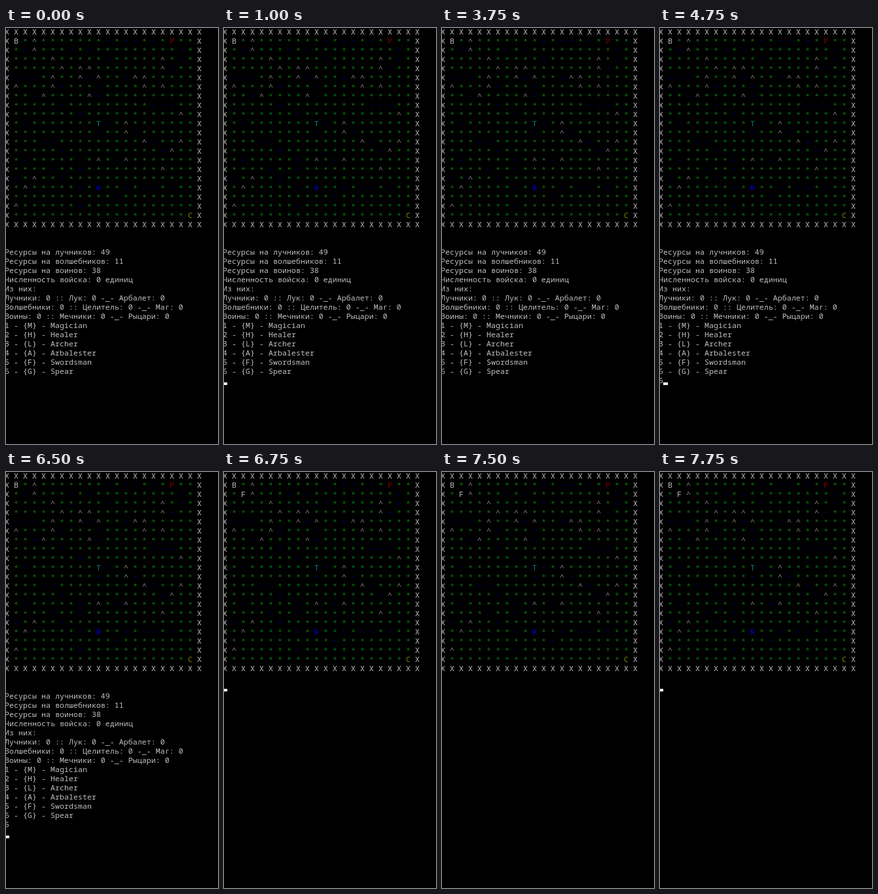
Recreate the animation shown at these times as an HTML page with a canvas. Size 324 by 635 pixels, loop 8000 ms.

```html
<!DOCTYPE html>
<html lang="ru">
<head>
<meta charset="utf-8">
<title>Console strategy</title>
<style>
html, body { margin: 0; width: 100%; height: 100%; overflow: hidden; background: #000; }
canvas { display: block; }
</style>
</head>
<body>
<canvas id="screen" width="324" height="635"></canvas>
<script>
const ctx = document.getElementById('screen').getContext('2d');
const LOOP = 8000, CHAR = 7, LINE = 14, LEFT = -2, BASE = 10;
const GRAY = '#c0c0c0';
const COLORS = {
  '*': '#0b7a0b', '~': '#000080', '^': '#8c8c8c',
  T: '#008080', R: '#0000e0', P: '#800000', C: '#808000'
};

const field = [
  'B*^*******~*~~*~*P**',
  '*~^***~*~*********~*',
  '****^*****~*****^*~*',
  '*****^*^^*******^~**',
  '~~~*^**^~^**~^^*****',
  '^***^~***~****^*^***',
  '**~^****^~**********',
  '*****~*********~~~**',
  '*******~**********^*',
  '*~*******T~*^*******',
  '*********~**^~******',
  '***~~*********^~**^*',
  '*****~**********~^**',
  '*~*****~*^*~^*******',
  '****~**~********^***',
  '~*^**~**************',
  '*^*****~*R**~*~~*~**',
  '***********~********',
  '^******~************',
  '*******************C'
];
const wall = 'X'.repeat(22);
const map = [wall, ...field.map(row => 'X' + row + 'X'), wall];

const info = [
  'Ресурсы на лучников: 49',
  'Ресурсы на волшебников: 11',
  'Ресурсы на воинов: 38',
  'Численность войска: 0 единиц',
  'Из них:',
  'Лучники: 0 :: Лук: 0 -_- Арбалет: 0',
  'Волшебники: 0 :: Целитель: 0 -_- Маг: 0',
  'Воины: 0 :: Мечники: 0 -_- Рыцари: 0',
  '1 - {M} - Magician',
  '2 - {H} - Healer',
  '3 - {L} - Archer',
  '4 - {A} - Arbalester',
  '5 - {F} - Swordsman',
  '6 - {G} - Spear'
];

// Cursor visibility: [from, to, column, line]
const blinks = [
  [1000, 1500, 0, 38], [2000, 2500, 0, 38], [3000, 3750, 0, 38], [4250, 4750, 0, 38],
  [4750, 5250, 1, 38], [5750, 6250, 1, 38],
  [6500, 6750, 0, 39],
  [6750, 7250, 0, 23], [7750, 8000, 0, 23]
];
const TYPED = 4750, PLACED = 6750;

function put(text, col, line, color = GRAY) {
  ctx.fillStyle = color;
  ctx.fillText(text, LEFT + col * CHAR, BASE + line * LINE);
}

function drawMap(placed) {
  map.forEach((row, y) => [...row].forEach((cell, x) => {
    const ch = placed && x === 2 && y === 2 ? 'F' : cell;
    put(ch, x * 2, y, COLORS[ch]);
  }));
}

function draw(t) {
  ctx.fillStyle = '#000';
  ctx.fillRect(0, 0, 324, 635);
  ctx.font = '11.667px "Noto Sans Mono", "DejaVu Sans Mono", monospace';
  const placed = t >= PLACED;
  drawMap(placed);
  if (!placed) {
    info.forEach((text, i) => put(text, 0, 24 + i));
    if (t >= TYPED) put('5', 0, 38);
  }
  const blink = blinks.find(([from, to]) => t >= from && t < to);
  if (blink) {
    const [, , col, line] = blink;
    ctx.fillStyle = '#fff';
    ctx.fillRect(LEFT + col * CHAR, line * LINE + 9, CHAR, 4);
  }
}

const start = performance.now();
function frame() {
  draw((performance.now() - start) % LOOP);
  requestAnimationFrame(frame);
}
frame();
</script>
</body>
</html>
```
